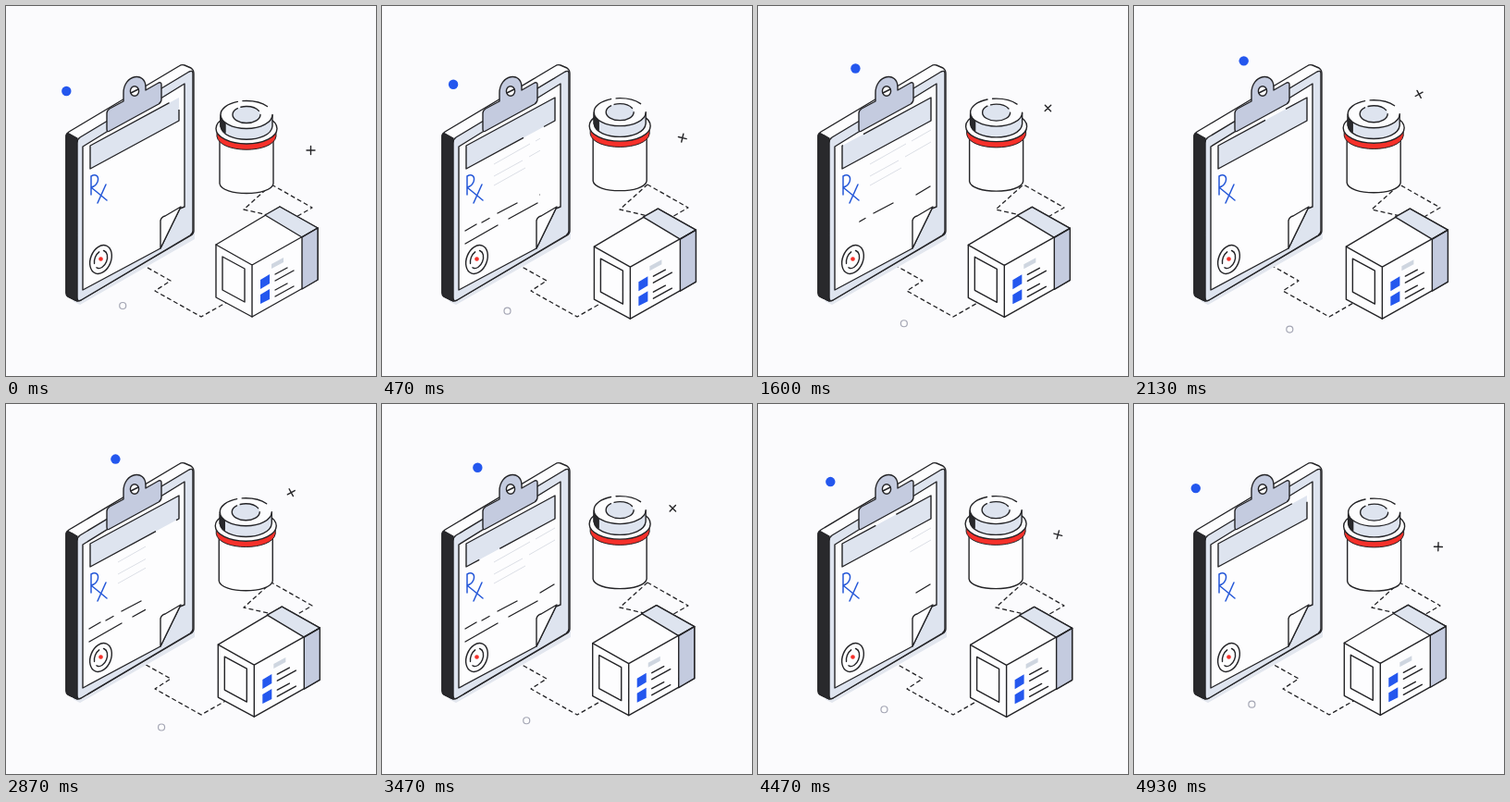
These frames come from a looping animation (400 by 400 pixels, 4990 ms). An HTML page:

```html
<!DOCTYPE html>
<html>
<head>
<meta charset="utf-8">
<style>
html, body { margin: 0; width: 100%; height: 100%; overflow: hidden; background: #fbfbfd }
svg { display: block; width: 100vw; height: 100vh }
.ink { stroke: #242427; stroke-width: 1.4; stroke-linejoin: round; stroke-linecap: round }
.paper { fill: #fdfdfe }
.light { fill: #dee4ef }
.mid { fill: #c4cbdf }
.dark { fill: #29292c }
.blue { fill: #2457ee }
.none { fill: none }
</style>
</head>
<body>
<svg viewBox="0 0 400 400">
  <defs>
    <clipPath id="wipe"><rect id="upper" y="120" height="160"/></clipPath>
    <clipPath id="wipe2"><rect id="lower" y="120" height="160"/></clipPath>
  </defs>

  <!-- connectors -->
  <g id="links" class="ink none" stroke-dasharray="5 3" style="stroke-linecap:butt;stroke-width:1.3">
    <path d="M146 279L178 297L161 308L211 336L246 316"/>
    <path d="M287 193L331 218L305 233"/>
    <path d="M287 193L257 220L292 228"/>
  </g>

  <!-- clipboard -->
  <path d="M72 319L80 323L204 252V244Z" fill="#e2e6ee"/>
  <g class="ink">
    <path class="paper" d="M65 141Q65 138 68 136L187 65Q190 63 193 64L200 67Q203 69 203 73V243Q203 246 200 248L81 318Q78 320 75 318L67 314Q65 313 65 310Z"/>
    <path class="dark" d="M65 141Q65 137 68 138L77 143V319L67 314Q65 313 65 310Z"/>
    <path class="light" d="M77 148Q77 144 80 142L198 71Q202 69 202 73V243Q202 246 199 248L81 318Q77 320 77 315Z"/>
    <path class="paper" d="M83 152L193 84V217L188 219L167 262L83 307Z"/>
    <path class="paper" d="M167 262V232Q168 228 172 227L189 217Z"/>
    <path class="light" stroke="none" d="M91 151L187 99V124L91 176Z"/>
    <path id="band" class="none" pathLength="268" stroke-dasharray="243 25" style="stroke-linecap:butt" d="M187 99V124L91 176V151Z"/>
    <path class="mid" d="M109 116Q109 113 112 111L127 103V94C127 74 151 70 151 88V91L165 83Q168 82 168 85V101Q168 104 165 106L112 135Q109 137 109 133Z"/>
    <ellipse class="paper" cx="139" cy="92" rx="4.6" ry="5.2"/>
    <path d="M135 94L143 90"/>
    <g transform="rotate(22 102.5 274)">
      <ellipse class="paper" cx="102.5" cy="274" rx="11" ry="16"/>
      <ellipse class="none" cx="102.5" cy="274" rx="6.5" ry="10" stroke-dasharray="14 5"/>
    </g>
  </g>
  <circle cx="102.5" cy="273.5" r="2.3" fill="#f5302a"/>
  <path class="none" stroke="#2457d8" stroke-width="1.5" stroke-linecap="round" stroke-linejoin="round"
    d="M92 204V184C97 181 101 184 99 190Q97 195 92 196L109 210M108 193L99 213"/>
  <g clip-path="url(#wipe)" class="none">
    <path stroke="#dcdfe6" d="M121 171L160 149M166 146L187 134M121 184L152 167M159 163L187 147M121 194L155 175"/>
    <path class="ink" d="M90 243L102 236M108 234L116 229.5M125 224L146 213M171 204L186 195"/>
  </g>
  <path class="ink none" clip-path="url(#wipe2)" d="M90 257L125 237M137 230L168 213"/>

  <!-- bottle -->
  <g id="bottle" class="ink">
    <path class="paper" d="M231 140V192C233 206 287 206 289 192V140Z"/>
    <path fill="#f5302a" stroke-width="1" d="M228 134V141C231 160 289 160 292 141V134Z"/>
    <ellipse class="paper" cx="260" cy="132.500" rx="33" ry="16.500"/>
    <path class="light" d="M232 118V130C234 149 286 149 288 130V118Z"/>
    <path class="dark" d="M232 120V130Q233 134 237 137V127Z"/>
    <ellipse class="paper" stroke="none" cx="260" cy="117.500" rx="28" ry="15"/>
    <ellipse class="none" cx="260" cy="117.500" rx="28" ry="15" pathLength="100" stroke-dasharray="68 4 20 8"/>
    <ellipse class="light" cx="260" cy="117.500" rx="15" ry="9" pathLength="100" stroke-dasharray="62 5 27 6"/>
  </g>

  <!-- carton -->
  <g id="carton">
    <g class="ink">
      <path class="paper" d="M227 258L296 217L337 240V296L266 336L227 315Z"/>
      <path class="light" d="M280 226L296 217L337 240L320 250Z"/>
      <path class="mid" d="M320 250L337 240V296L320 306Z"/>
      <path class="none" d="M227 258L266 280L337 240M266 280V336M234 271L258 284V320L234 307Z"/>
      <path d="M291 290L304 283M291 297L311 286M291 307L304 300M291 314L311 303"/>
    </g>
    <path fill="#cfd6e0" d="M287 279L300 272V277L287 284Z"/>
    <path class="blue" d="M275 296L285 290V300L275 306ZM275 312L285 306V317L275 322Z"/>
  </g>

  <!-- drifting marks -->
  <circle id="dot" class="blue" r="5.2"/>
  <circle id="ring" class="paper" r="3.5" stroke="#a4a6b4" stroke-width="1.2"/>
  <path id="cross" class="ink" d="M-4.500 0H4.500M0 -4.500V4.500"/>
</svg>
<script>
const LOOP = 4990;
const el = id => document.getElementById(id);
const clamp = v => Math.max(0, Math.min(1, v));
// There-and-back ramp 0..1..0, n times per loop
const swing = (t, n) => 1 - Math.abs(1 - 2 * (t * n / LOOP % 1));
const move = (id, x, y, turn = 0) =>
  el(id).setAttribute('transform', `translate(${x} ${y}) rotate(${turn})`);
// Shows the writing between two fractions of its width
function reveal(id, from, to) {
  el(id).setAttribute('x', 88 + 102 * from);
  el(id).setAttribute('width', 102 * Math.max(0, to - from));
}

function draw(now) {
  const t = now % LOOP, s = swing(t, 1), half = t % (LOOP / 2);
  move('dot', 65.3 + 62.5 * s, 92 - 38.2 * s);
  move('ring', 126.2 + 49.3 * s, 324 + 30 * s);
  move('cross', 329.5 - 25 * s, 156 - 71 * s, 72 * s);

  const b = swing(t, 5), c = swing(t, 3);
  move('bottle', -3 * b, -3 * b);
  move('carton', 4.2 * c, 3.8 * c);

  el('band').setAttribute('stroke-dashoffset', -(268 * half / (LOOP / 2) + 13));
  el('links').setAttribute('stroke-dashoffset', -80 * t / LOOP);

  // Writing appears, then clears, from left to right
  const shown = clamp((half - 80) / 480);
  reveal('upper', clamp((half - 1180) / 920) ** 2, shown);
  reveal('lower', clamp((half - 1050) / 400), shown);
}

const began = performance.now();
function tick() {
  draw(performance.now() - began);
  requestAnimationFrame(tick);
}
tick();
</script>
</body>
</html>
```
